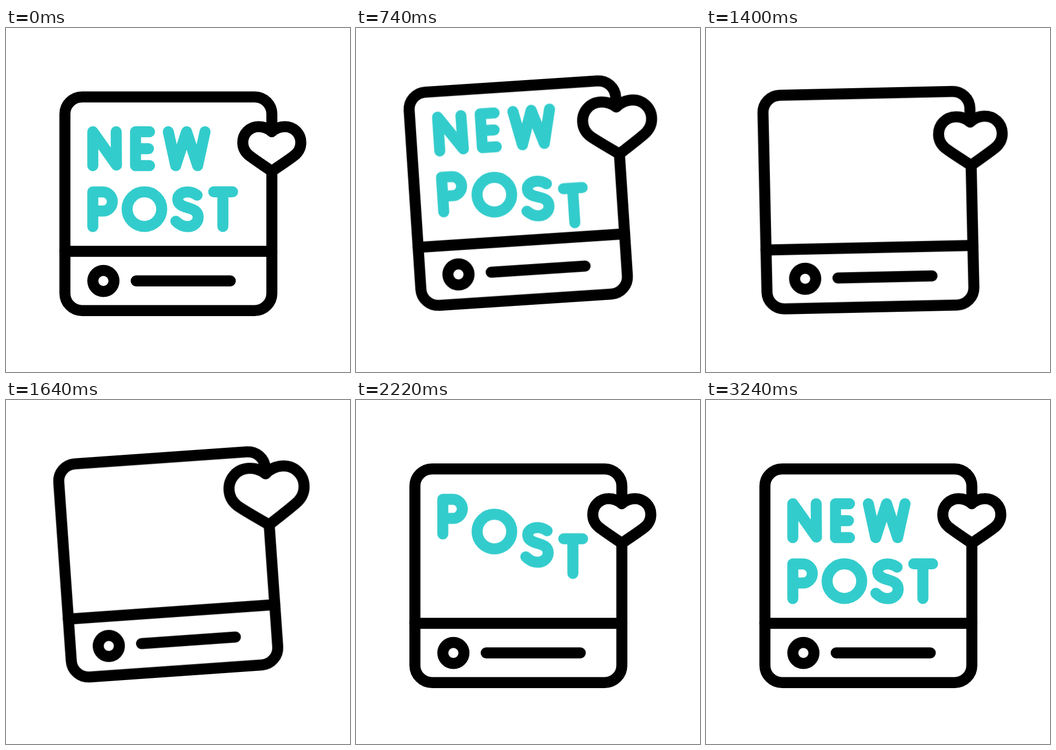
Write an HTML page without scripts that moves like this. It is 640x640 px and loops after 3.26 s.

```html
<!DOCTYPE html>
<html lang="en">
<head>
<meta charset="utf-8">
<title>New post</title>
<style>
  html, body { margin: 0; width: 100%; height: 100%; overflow: hidden; background: #fff; }
  svg { display: block; width: 640px; height: 640px; }

  .card, .heart, .letters > * {
    animation: 3260ms cubic-bezier(.333, 0, .667, 1) infinite;
  }
  .card {
    fill: none; stroke: #000; stroke-width: 20.5;
    stroke-linecap: round; stroke-linejoin: round;
    transform-origin: 0 320px;
    animation-name: tilt;
  }
  .heart {
    fill: #fff; vector-effect: non-scaling-stroke;
    transform-origin: 494.5px 266px;
    animation-name: beat;
  }
  .letters { stroke: #33cccc; }
  .letters > * {
    animation-name: drop;
    animation-delay: calc(var(--i) * 43ms);
  }

  @keyframes tilt {
    0%, 30.06%, 36.66%, 66.72%, 100% { transform: rotate(0deg); }
    19.17%, 55.83% { transform: rotate(-5deg); }
  }
  @keyframes beat {
    0%, 27.76%, 36.66%, 64.5%, 100% { transform: scale(1); }
    18.25%, 54.91% { transform: scale(1.35); }
  }
  /* wind up, fall out below, come back from above, overshoot, settle */
  @keyframes drop {
    0% { transform: translateY(0); }
    17.79% { transform: translateY(-18.3px); animation-timing-function: cubic-bezier(.333, 0, .667, .333); }
    24.85% { transform: translateY(59px); animation-timing-function: linear; }
    34.14% { transform: translateY(262px); animation-timing-function: step-end; }
    56.75% { transform: translateY(-262px); animation-timing-function: linear; }
    64.14% { transform: translateY(-121px); animation-timing-function: cubic-bezier(.333, .667, .667, 1); }
    75.61% { transform: translateY(8.4px); }
    91.1%, 100% { transform: translateY(0); }
  }
</style>
</head>
<body>
<svg viewBox="0 0 640 640" role="img" aria-label="New post">
  <clipPath id="screen"><rect x="109.6" y="128" width="385" height="287.5"/></clipPath>
  <g class="card">
    <g class="letters" clip-path="url(#screen)">
      <path style="--i:6" d="M161.5 256V193L205.5 255L205 193"/>
      <path style="--i:5" d="M267 193H241V256H267M241 224.5H265"/>
      <path style="--i:4" d="M302 193L315.7 256L336 193L356.5 256L370.3 193"/>
      <path style="--i:3" d="M161.5 369.5V305H180a17.8 17.8 0 0 1 0 35.6H161.5"/>
      <circle style="--i:2" cx="257.5" cy="337" r="32.2"/>
      <path style="--i:1" d="M355.5 311C350 307 344 305 337.5 305C327 305 319.5 311 319.5 318.5C319.5 329 330 332 338.5 334.5C349 337.5 357.5 341 357.5 352C357.5 362 349 369.5 338 369.5C329 369.5 322 365.5 316 359.5"/>
      <path style="--i:0" d="M386.5 304.7H421.5M403.5 304.7V369.3"/>
    </g>
    <rect x="109.6" y="128.2" width="385" height="397.5" rx="32"/>
    <path d="M109.6 415.5H494.6M242.2 470.5H417.3"/>
    <circle cx="181.2" cy="470.6" r="19.7"/>
    <path class="heart" d="M494.5 193C488 187 479 183.5 470 183.5C453.5 183.5 440.5 196.5 440.5 213C440.5 222 444 229.5 450.5 235.5C455 239.5 476 254 494.5 266.4C513 254 534 239.5 538.5 235.5C545 229.5 548.5 222 548.5 213C548.5 196.5 535.5 183.5 519 183.5C510 183.5 501 187 494.5 193Z"/>
  </g>
</svg>
</body>
</html>
```
